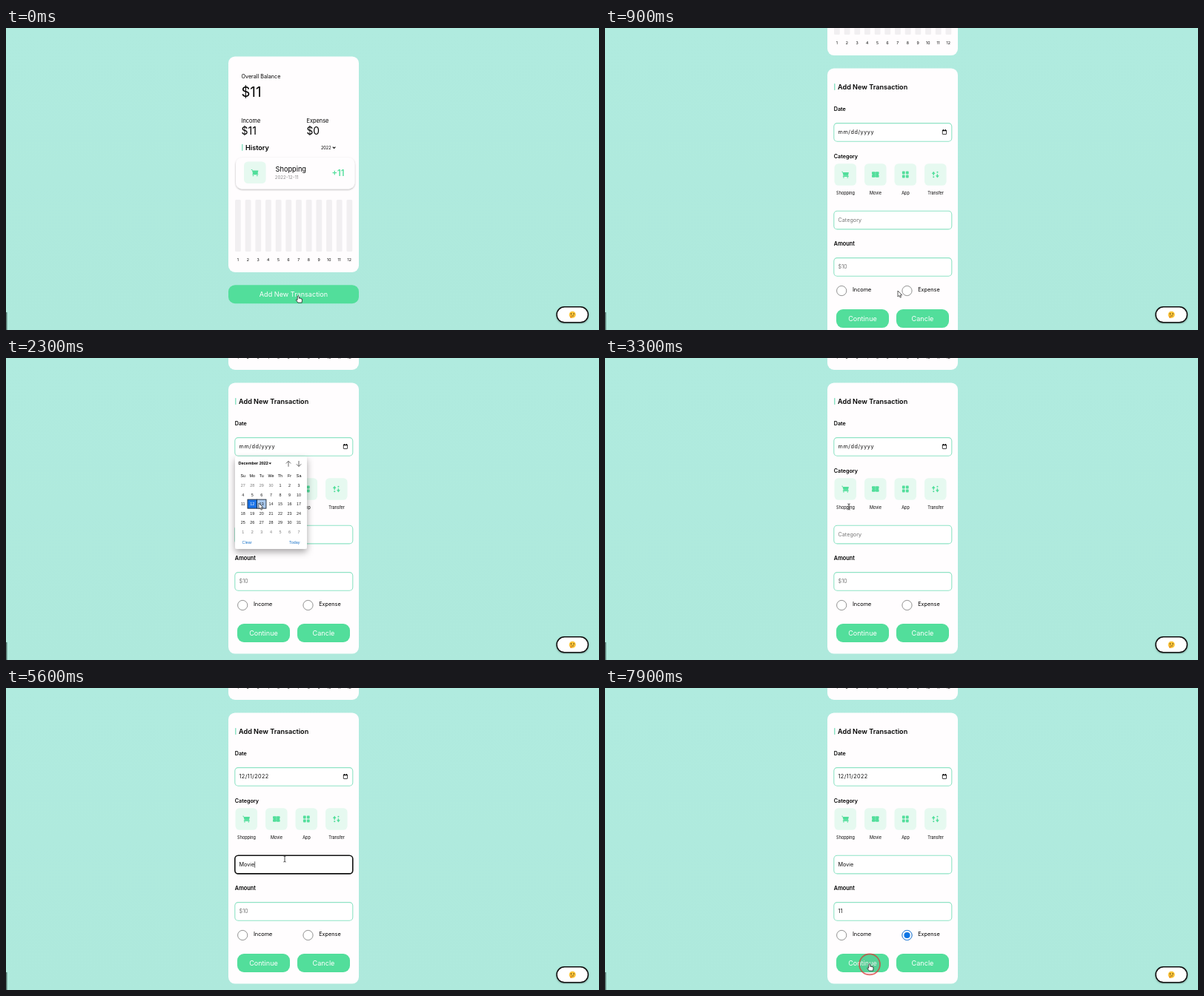
Animation of 800 by 408 pixels, one loop 8 s. Source, as an HTML page:

```html
<!DOCTYPE html>
<html lang="en">
<head>
<meta charset="utf-8">
<title>Expense tracker</title>
<style>
html, body { margin: 0; width: 100%; height: 100%; overflow: hidden; background: #afeade; }
svg { display: block; width: 800px; height: 408px; font-family: Inter, sans-serif; }
.pick { font-family: "Liberation Sans", sans-serif; }
</style>
</head>
<body>
<svg id="stage" viewBox="0 0 800 408" xmlns="http://www.w3.org/2000/svg"></svg>
<script>
const LOOP = 8000, STEP = 100, SCROLL = 314;
const GREEN = '#52de9b', MINT = '#8fe3c5', TILE = '#e6f9f0', CARD = '#fffdfe';

const rect = (x, y, w, h, r, fill, more = '') =>
  `<rect x="${x}" y="${y}" width="${w}" height="${h}" rx="${r}" fill="${fill}" ${more}/>`;
const text = (x, y, size, str, more = '') =>
  `<text x="${x}" y="${y}" font-size="${size}" ${more}>${str}</text>`;
const path = (d, more) => `<path d="${d}" ${more}/>`;
const bold = 'font-weight="600"', mid = 'text-anchor="middle"';
const range = (n, f) => Array.from({ length: n }, (_, i) => f(i)).join('');

// Icons are centred on 0,0
const icons = {
  Shopping: path('M-5-4.2H-3.6L-3.2-2.9H4.6L3.6 1.6H-2.6L-4-3.4H-5Z', `fill="${GREEN}"`) +
    path('M-2.8 2.2H3.8M-2.4 4.1h.1M3 4.1h.1', `stroke="${GREEN}" stroke-width="1.5" stroke-linecap="round"`),
  Movie: path('M-4-3.8H-.6L0-3 .6-3.8H4Q4.8-3.8 4.8-3V-1.2Q3.6 0 4.8 1.2V3Q4.8 3.8 4 3.8H.6L0 3-.6 3.8H-4Q-4.8 3.8-4.8 3V1.2Q-3.6 0-4.8-1.2V-3Q-4.8-3.8-4-3.8Z', `fill="${GREEN}"`) +
    path('M0-2V2.2', `stroke="${TILE}" stroke-width=".5" stroke-dasharray="1 .8"`),
  App: range(4, i => rect(i % 2 ? .6 : -4.4, i > 1 ? .6 : -4.4, 3.8, 3.8, .9, GREEN)),
  Transfer: path('M-2.6-4.3-.2-1H-1.9V1H-3.3V-1H-5ZM2.6 4.4 .2 1.3H1.9V-.8H3.3V1.3H5Z', `fill="${GREEN}"`) +
    path('M2.6-3.2h.1M-2.6 3.2h.1', `stroke="${GREEN}" stroke-width="2" stroke-linecap="round"`)
};
const tile = (x, y, name) => rect(x, y, 29.6, 29.6, 5.5, TILE) +
  `<g transform="translate(${x + 14.8} ${y + 14.8})">${icons[name]}</g>`;
const heading = (x, y, str) => rect(x, y - 7.5, 1.5, 8.8, 0, MINT) + text(x + 5, y, 9.1, str, bold);
const button = (x, y, w, str) => rect(x, y, w, 25, 9, GREEN) +
  text(x + w / 2, y + 15.6, 9.1, str, `${mid} fill="#fff"`);
const field = (id, y) => rect(308.8, y, 159, 24.6, 4.5, '#fff', `id="${id}Box" stroke="${MINT}" stroke-width="1.1"`) +
  text(314.5, y + 14.8, 7.25, '', `id="${id}"`);
const radio = (x, str) =>
  `<circle cx="${x}" cy="334" r="6.6" fill="#fff" stroke="#777" stroke-width=".8"/>` + text(x + 14.7, 334.6, 7.3, str);

const balance =
  rect(300, 38.4, 176, 291.6, 9, CARD) +
  text(317.5, 67.8, 7.2, 'Overall Balance') + text(317.5, 93, 18.5, '$11') +
  text(317.5, 128.3, 7.4, 'Income') + text(405.5, 128.3, 7.4, 'Expense') +
  text(317.5, 144, 14, '$11') + text(405.5, 144, 13.8, '$0') +
  heading(318, 164.5, 'History') + text(425, 163.7, 5.5, '2022') +
  path('M440.8 160.6 442.6 162.4 444.4 160.6', 'fill="none" stroke="#111" stroke-width="1.1"') +
  rect(310, 175, 160.4, 42.4, 8.5, CARD, 'filter="url(#soft)"') +
  tile(321, 180.5, 'Shopping') + text(363.6, 194.3, 9.2, 'Shopping') +
  text(362.8, 204.3, 6.1, '2022-12-11', 'fill="#8b8b8b"') +
  text(439.5, 200, 11.2, '+11', `fill="${GREEN}" ${bold}`) +
  range(12, i => rect(309 + 13.68 * i, 232, 7.8, 70, 1.5, '#f1eff1') +
    text(312.7 + 13.68 * i, 314.6, 5.2, i + 1, mid));

const form =
  rect(300, 33.4, 176, 366.2, 9, CARD) +
  heading(309, 61.6, 'Add New Transaction') +
  text(308.8, 91.2, 7.2, 'Date', bold) + field('date', 107.6) +
  rect(455.3, 117.2, 5.2, 5.4, .5, 'none', 'stroke="#111" stroke-width=".8"') +
  path('M455 117.6h5.8M456.4 116v1M459.4 116v1', 'stroke="#111" stroke-width="1.2"') +
  text(308.8, 154.6, 7.2, 'Category', bold) +
  Object.keys(icons).map((name, i) => tile(309.5 + 40.5 * i, 162.2, name) +
    text(324.5 + 40.5 * i, 204, 5.5, name, mid)).join('') +
  field('cat', 226.3) +
  text(308.8, 273.4, 7.35, 'Amount', bold) + field('amt', 289.6) +
  radio(319.2, 'Income') + radio(407.5, 'Expense') +
  '<g id="checked"><circle cx="407.5" cy="334" r="6.6" fill="#fff" stroke="#0b74e5" stroke-width=".9"/>' +
  '<circle cx="407.5" cy="334" r="4.1" fill="#0b74e5"/></g>' +
  button(312, 359, 71, 'Continue') + button(393, 359, 71, 'Cancle') +
  rect(0, 0, .7, 8.4, 0, '#222', 'id="caret"');

const COL = 12.57, cellX = i => 319.7 + COL * (i % 7), cellY = i => 172 + COL * Math.floor(i / 7);
const dayOf = i => i < 4 ? 27 + i : i < 35 ? i - 3 : i - 34;
const cell = (id, fill) => rect(-6.3, -6, 12.4, 12, 0, fill, `id="${id}" stroke="#1d2a3a" stroke-width=".9"`);
const picker =
  rect(309, 133, 97, 125, 3, '#fff', 'filter="url(#deep)"') +
  text(313.5, 144.4, 5.5, 'December 2022', 'font-weight="bold"') +
  path('M354.5 141.5h3.6l-1.8 2.2Z', 'fill="#111"') +
  path('M381 146.8V139.4M377.8 142.5 381 139.3 384.2 142.5M395 139V146.4M391.8 143.3 395 146.5 398.2 143.3', 'fill="none" stroke="#444" stroke-width=".8"') +
  ['Su', 'Mo', 'Tu', 'We', 'Th', 'Fr', 'Sa'].map((d, i) => text(cellX(i), 161, 5.4, d, mid)).join('') +
  cell('hover', '#a9c9ee') + cell('today', '#1a73e8') +
  range(42, i => text(cellX(i), cellY(i) + 2, 5.4, dayOf(i),
    `${mid} fill="${i === 15 ? '#fff' : i < 4 || i > 34 ? '#7a7a7a' : '#1a1a1a'}"`)) +
  text(318.6, 250.6, 5.4, 'Clear', 'fill="#1a73c8"') + text(382, 250.6, 5.4, 'Today', 'fill="#1a73c8"');

const chat =
  rect(743, 376.8, 42.4, 21, 10.5, '#fff', 'stroke="#111" stroke-width="1.5" filter="url(#soft)"') +
  '<circle cx="764.2" cy="387.2" r="4.5" fill="#fbc53a"/>' +
  path('M762.4 385.6v1.2M766 385.6v1.2', 'stroke="#5b3a12" stroke-width="1" stroke-linecap="round"') +
  path('M762.4 389.2 766 388.8', 'stroke="#5b3a12" stroke-width=".7"') +
  path('M760.6 388.6 763.8 389.8 763.4 391.8H761.2Z', 'fill="#ef9b22"');

const pointers = {
  arrow: path('M0 0V8L1.9 6.4 3.2 9.2 4.5 8.6 3.3 5.9H5.8Z', 'fill="#fff" stroke="#333" stroke-width=".8"'),
  hand: path('M-1.2-1.4Q-.1-2.4.6-1.2L1 2Q2-.2 2.6 2.2 3.6.8 4 2.7 5 1.8 5.1 3.4L4.6 7.6H-.6L-3.2 4.2Q-3.2 2.6-1.4 4Z', 'fill="#fff" stroke="#222" stroke-width=".8" stroke-linejoin="round"'),
  beam: path('M-1.6-4Q0-4 0-3 0-4 1.6-4M0-3.2V3.2M-1.6 4Q0 4 0 3 0 4 1.6 4', 'fill="none" stroke="#333" stroke-width=".9"')
};

const stage = document.getElementById('stage');
stage.innerHTML =
  `<defs><linearGradient id="bg" x2="0" y2="1"><stop stop-color="#b0ebdf"/><stop offset="1" stop-color="#aee9dc"/></linearGradient>
  <linearGradient id="edge"><stop stop-color="#3f5a55"/><stop offset="1" stop-color="#3f5a55" stop-opacity="0"/></linearGradient>
  <filter id="soft"><feDropShadow dx="0" dy="1" stdDeviation="1.2" flood-opacity=".3"/></filter>
  <filter id="deep" x="-20%" y="-20%" width="140%" height="150%"><feDropShadow dx="0" dy="4" stdDeviation="5" flood-opacity=".35"/></filter></defs>` +
  rect(0, 0, 800, 408, 0, 'url(#bg)') + rect(0, 384, 2.5, 24, 0, 'url(#edge)') +
  `<g id="page">${balance}<g id="add">${button(300, 347.2, 176, 'Add New Transaction')}</g>` +
  `<g id="form" transform="translate(0 ${SCROLL})">${form}</g></g>` +
  `<g id="picker" class="pick">${picker}</g>${chat}` +
  '<circle id="ring" r="14" fill="#777" fill-opacity=".12" stroke="#dc3232" stroke-opacity=".72" stroke-width="1.7"/>' +
  Object.keys(pointers).map(k => `<g id="${k}">${pointers[k]}</g>`).join('');

const $ = id => document.getElementById(id);
const show = (id, on) => $(id).setAttribute('display', on ? 'inline' : 'none');
const move = (id, x, y) => $(id).setAttribute('transform', `translate(${x} ${y})`);
const ease = u => u * u * (3 - 2 * u);
const ramp = (t, a, b) => ease(Math.min(1, Math.max(0, (t - a) / (b - a))));

// time, x, y, pointer shape from that time on
const track = [
  [0, 394.5, 362, 'hand'], [300, 394.5, 362, 'arrow'], [600, 395, 355, 'arrow'], [1000, 395, 355, 'arrow'],
  [1500, 459.5, 120, 'arrow'], [1800, 459.5, 120, 'arrow'], [2200, 341, 196, 'arrow'], [2500, 341, 196, 'arrow'],
  [2900, 323, 196, 'arrow'], [3200, 323, 196, 'arrow'], [3300, 329, 201, 'beam'], [3700, 329, 201, 'beam'],
  [4200, 376, 237, 'beam'], [4500, 400, 180, 'arrow'], [4700, 400, 180, ''],
  [5500, 462, 132, 'arrow'], [5600, 376, 231, 'beam'], [5700, 376, 231, 'beam'], [6000, 372, 311, 'beam'],
  [6700, 372, 311, 'beam'], [7000, 404.5, 334, 'hand'], [7200, 404.5, 334, 'hand'],
  [7700, 357, 373, 'hand'], [8000, 357, 373, 'hand']
];
const clicks = [[100, 300], [1500, 1800], [3000, 3200], [4200, 4400], [6000, 6300], [7000, 7200], [7700, 8000]];

function pointerAt(t) {
  const i = track.findIndex((k, n) => n === track.length - 1 || t < track[n + 1][0]);
  const a = track[i], b = track[i + 1] || a, u = ramp(t, a[0], b[0]);
  return { x: a[1] + (b[1] - a[1]) * u, y: a[2] + (b[2] - a[2]) * u, kind: a[3] };
}

function fill(id, value, hint, hintColor) {
  const el = $(id);
  el.textContent = value || hint;
  el.setAttribute('fill', value ? '#111' : hintColor);
}

function focus(id, on) {
  $(id + 'Box').setAttribute('stroke', on ? '#111' : MINT);
  $(id + 'Box').setAttribute('stroke-width', on ? 1.6 : 1.1);
}

function draw(t) {
  const p = pointerAt(t);
  move('page', 0, -SCROLL * ramp(t, 500, 975));
  show('add', t < 300);
  show('form', t >= 300);

  const open = t >= 1800 && t < 3300;
  show('picker', open);
  const c = Math.round((p.x - cellX(0)) / COL), r = Math.round((p.y - cellY(0)) / COL);
  const over = open && c >= 0 && c < 7 && r >= 0 && r < 6;
  show('hover', over);
  if (over) move('hover', cellX(c), cellY(r * 7));
  move('today', cellX(15), cellY(15));

  fill('date', t >= 3400 ? '12/11/2022' : '', 'mm/dd/yyyy', '#111');
  $('date').setAttribute('letter-spacing', t >= 3400 ? .38 : .55);
  const letters = [4700, 4900, 5100, 5200, 5300].filter(k => t >= k).length;
  const digits = [6600, 6800].filter(k => t >= k).length;
  fill('cat', 'Movie'.slice(0, letters), 'Category', '#777');
  fill('amt', '11'.slice(0, digits), '$10', '#777');

  const inCat = t >= 4300 && t < 6100, inAmt = t >= 6100 && t < 7200;
  focus('cat', inCat);
  focus('amt', inAmt);
  show('caret', inCat || inAmt);
  const typed = inCat ? letters : digits;
  const width = typed ? $(inCat ? 'cat' : 'amt').getComputedTextLength() : 0;
  move('caret', 314.6 + width, inCat ? 234.4 : 297.7);
  show('checked', t >= 7200);

  show('ring', clicks.some(([a, b]) => t >= a && t < b));
  move('ring', p.x + (p.kind === 'arrow' ? .8 : 0), p.y + (p.kind === 'arrow' ? 1.8 : .4));
  for (const k in pointers) {
    show(k, k === p.kind);
    move(k, p.x, p.y + (k === 'hand' ? 1.5 : 0));
  }
}

const start = performance.now();
function tick() {
  const t = (performance.now() - start) % LOOP;
  draw(Math.floor(t / STEP) * STEP);
  requestAnimationFrame(tick);
}
tick();
</script>
</body>
</html>
```
